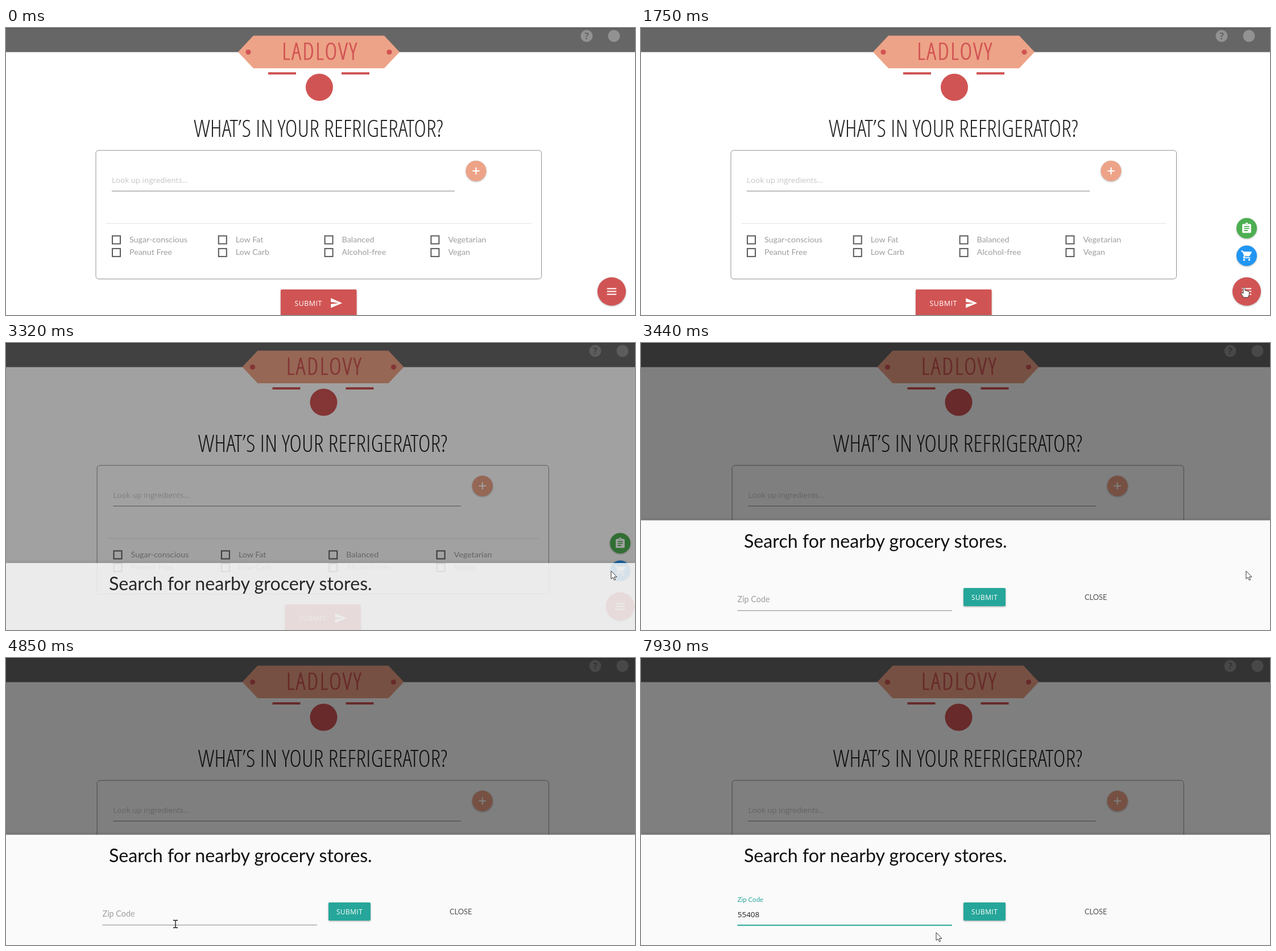
An HTML page for the animation above (8000 ms loop, 1106x506 px).

```html
<!DOCTYPE html>
<html lang="en">
<head>
<meta charset="utf-8">
<title>Recipe finder</title>
<style>
  html, body { margin: 0; width: 100%; height: 100%; overflow: hidden; background: #fff; }
  svg { display: block; width: 100%; height: 100%; }
  text { font-family: Lato, sans-serif; font-size: 14.3px; fill: #9e9e9e; white-space: pre; }
  .ui { font-family: "Open Sans", "Noto Sans", sans-serif; font-size: 13.4px; }
  .narrow { font-family: "Open Sans Condensed Light", "Open Sans Cond Light", "Noto Sans ExtraCondensed Light",
      "Noto Sans Condensed Light", "Open Sans", sans-serif;
    font-stretch: condensed; font-weight: 300; font-size: 39.5px; text-anchor: middle; }
  .headline { fill: #212121; }
  .brand { fill: #d15454; stroke: #d15454; stroke-width: .7; letter-spacing: 2.5px; }
  .button { font-size: 12.4px; font-weight: 500; letter-spacing: .5px; fill: #fff; }
  .raised { filter: drop-shadow(0 1.5px 1.5px rgba(0, 0, 0, .32)); }
  .icon { fill: none; stroke: #fff; stroke-width: 2.1; }
</style>
</head>
<body>
<svg viewBox="0 0 1106 506" xmlns="http://www.w3.org/2000/svg">
  <rect width="1106" height="506" fill="#fff"/>
  <g id="narrowPage"></g>
  <g id="widePage"></g>
  <rect id="shade" width="1106" height="506"/>
  <g id="sheet">
    <rect y="311.6" width="1106" height="210" fill="#fafafa" style="filter:drop-shadow(0 -1px 3px rgba(0,0,0,.16))"/>
    <text x="181" y="360" style="font-size:32.2px;fill:#111">Search for nearby grocery stores.</text>
    <text id="zipLabel" x="169.5">Zip Code</text>
    <text id="zip" class="ui" x="169.7" y="456.5" style="font-size:13.5px;fill:#222"></text>
    <rect id="caret" y="443" width="1" height="16" fill="#222"/>
    <rect id="zipLine" x="169.5" width="377.5"/>
    <rect class="raised" x="567" y="431" width="74" height="32" rx="2" fill="#26a69a"/>
    <text class="ui button" x="581" y="452.3" style="font-size:11.8px">SUBMIT</text>
    <text x="780" y="451.5" style="font-size:12.9px;fill:#555">CLOSE</text>
  </g>
  <g id="cursor">
    <circle id="ring" r="10" fill="none" stroke="#777" stroke-opacity=".45"/>
    <path id="arrow" d="M0 0V14L3.2 11.2 5.5 16.2 7.7 15.2 5.4 10.4H10Z" fill="#fff" stroke="#222" stroke-width=".9"/>
    <path id="hand" d="M-1.5 1.5Q0-1 1.5 1.5V6Q3 5 4 6.5 6 5.5 6.5 7.5 9 6.5 9 9V13L7 18H-1L-5.5 11Q-5 8.5-1.5 11Z"
      fill="#fff" stroke="#222" stroke-width=".9"/>
    <path id="beam" d="M-4-6.5H-1L0-6 1-6.5H4M0-6V6M-4 6.5H-1L0 6 1 6.5H4" fill="none" stroke="#111" stroke-width="1.3"/>
  </g>
</svg>
<script>
const LOOP = 8000;
const $ = id => document.getElementById(id);

// extra: width the page gains when its scrollbar disappears
function pageMarkup(extra) {
  const at = x => x * (1 + extra / 1099);
  const mid = extra / 2;
  const columns = [['Sugar-conscious', 'Peanut Free'], ['Low Fat', 'Low Carb'],
    ['Balanced', 'Alcohol-free'], ['Vegetarian', 'Vegan']];
  const checks = columns.map((labels, col) => labels.map((label, row) => {
    const x = at(186 + col * 186.8), y = 365.5 + row * 22.4;
    return `<rect x="${x + 1}" y="${y + 1}" width="14" height="14" fill="none" stroke="#5a5a5a" stroke-width="2"/>
      <text x="${x + 31}" y="${y + 12.5}">${label}</text>`;
  }).join('')).join('');
  const rule = (x1, x2, y, color) =>
    `<path d="M${at(x1)} ${y}H${at(x2)}" stroke="${color}"/>`;

  return `
  <rect width="1106" height="42.5" fill="#666"/><rect width="1106" height="1" fill="#505050"/>
  <g transform="translate(${extra})">
    <circle cx="1021" cy="14" r="10.5" fill="#929292"/>
    <text class="ui" x="1021" y="20" text-anchor="middle" style="font-size:16px;font-weight:700;fill:#666">?</text>
    <circle cx="1069" cy="14" r="10.5" fill="#929292"/>
  </g>
  <g transform="translate(${mid})">
    <path d="M408 42.3 435 13.5H665L692 42.3 665 71H435Z" fill="#eda387"/>
    <g fill="#d15454">
      <circle cx="426" cy="42.5" r="4.6"/><circle cx="674" cy="42.5" r="4.6"/>
      <path d="M461 78h49v4h-49zM590 78h49v4h-49z"/>
      <circle cx="551" cy="104.5" r="24"/>
    </g>
    <text class="narrow brand" data-max="138" x="552.5" y="56.3">LADLOVY</text>
    <text class="narrow headline" data-max="456" x="549.5" y="192">WHAT’S IN YOUR REFRIGERATOR?</text>
  </g>
  <rect x="${at(158)}" y="215.8" width="${at(783.5)}" height="226.7" rx="5" fill="none" stroke="#909090"/>
  <text class="ui" x="${at(186)}" y="273" style="fill:#c4c4c4">Look up ingredients...</text>
  ${rule(186, 789, 287.5, '#858585')}${rule(176, 924, 344.5, '#e4e4e4')}
  <g transform="translate(${at(826.5)} 252)">
    <circle class="raised" r="18" fill="#eda387"/><path class="icon" d="M-6.2 0H6.2M0-6.2V6.2"/>
  </g>
  ${checks}
  <g transform="translate(${mid})">
    <rect class="raised" x="483" y="461" width="133.5" height="50" rx="2" fill="#d15454"/>
    <text class="ui button" x="507.5" y="490">SUBMIT</text>
    <path transform="translate(569.3 473.5) scale(.95)" d="M2 21 23 12 2 3V10L17 12 2 14Z" fill="#fff"/>
  </g>
  <g transform="translate(${1065 + extra})">
    <g class="listFab"><g class="raised"><circle r="18" fill="#4caf50"/></g>
      <rect x="-7.8" y="-7.5" width="15.6" height="15.8" rx="1.5" fill="#fff"/>
      <circle cy="-7.5" r="2.4" fill="#fff"/><circle cy="-7.2" r=".9" fill="#4caf50"/>
      <path d="M-4.5-3.2H4.5M-4.5.4H4.5M-4.5 4H1.8" stroke="#4caf50" stroke-width="1.8"/></g>
    <g class="cartFab"><g class="raised"><circle r="18" fill="#2196f3"/></g>
      <g transform="scale(.9) translate(-12 -12)">
        <path class="icon" d="M1 3H4L8 12 6 15Q5.6 16 7 16H19"/>
        <path d="M5.2 4H21Q22.4 4 21.7 5.5L18 12Q17.5 13 16.3 13H8.5Z" fill="#fff"/>
        <circle cx="7" cy="20" r="2" fill="#fff"/><circle cx="17" cy="20" r="2" fill="#fff"/></g></g>
    <g transform="translate(0 464.5)">
      <circle class="raised" r="25" fill="#d15454"/><path class="icon" d="M-8.2-5H8.2M-8.2 0H8.2M-8.2 5H8.2"/></g>
  </g>`;
}

$('narrowPage').innerHTML = pageMarkup(0);
$('widePage').innerHTML = pageMarkup(15);

// Choose a font size that suits whichever light face is installed
for (const el of document.querySelectorAll('.narrow')) {
  const ratio = Math.min(1.06, el.dataset.max / el.getComputedTextLength());
  el.style.fontSize = 39.5 * ratio + 'px';
}

// Rows start with the time in ms and hold until the next row
const POINTER = [
  [0, null], [310, 'arrow', 1012, 496], [390, 'arrow', 1013, 478], [470, 'arrow', 1010, 462],
  [550, 'arrow', 1005, 450], [630, 'arrow', 999, 443], [710, 'arrow', 995, 441],
  [940, 'arrow', 997, 443], [1020, 'arrow', 1010, 448], [1100, 'arrow', 1030, 453],
  [1190, 'hand', 1048, 457], [1270, 'hand', 1058, 458], [1350, 'hand', 1060.5, 457],
  [2140, 'hand', 1063, 455], [2210, 'hand', 1065, 448], [2290, 'hand', 1066, 436],
  [2360, 'arrow', 1066, 424], [2430, 'hand', 1065, 412], [2510, 'hand', 1064, 405],
  [2580, 'hand', 1064, 402], [3120, 'arrow', 1064, 402],
  [4290, 'arrow', 1046, 404], [4370, 'arrow', 960, 411], [4450, 'arrow', 810, 424],
  [4530, 'arrow', 620, 441], [4610, 'beam', 455, 455], [4690, 'beam', 350, 464],
  [4770, 'beam', 308, 468], [4850, 'beam', 298, 469],
  [7850, 'arrow', 440, 478], [7930, 'arrow', 519, 484]
];
const RING = [[0, 0], [2890, 1], [3120, 0], [5210, 1], [5390, 0]];
const LIST_FAB = [[0, 0], [1600, .45], [1750, 1]];
const CART_FAB = [[0, 0], [1520, .6], [1600, .95], [1750, 1]];
const SHEET = [[0, 0, 0, 0], [3320, 76.3, .84, .37], [3440, 1, 1, .5], [3540, 0, 1, .5]];
const FOCUS = [[0, 0], [5390, .5], [5480, 1]];
const TYPED = [[0, 0], [6190, 1], [6350, 2], [6590, 3], [7040, 4], [7280, 5]];
const CARET = [[0, 0], [5390, 1], [5750, 0], [6190, 1], [7760, 0]];

const pick = (table, t) => table.findLast(row => row[0] <= t).slice(1);
const set = (el, attrs) => { for (const key in attrs) el.setAttribute(key, attrs[key]); };
const show = (el, on) => set(el, { visibility: on ? 'visible' : 'hidden' });

function placeFab(name, y, scale) {
  for (const el of document.querySelectorAll('.' + name)) {
    set(el, { transform: `translate(0 ${y}) scale(${scale})`, opacity: scale });
  }
}

function render(t) {
  const [drop, opacity, dark] = pick(SHEET, t);
  const open = opacity > 0;
  show($('narrowPage'), !open);
  show($('widePage'), open);
  set($('shade'), { opacity: dark });
  set($('sheet'), { transform: `translate(0 ${drop})`, opacity });

  placeFab('listFab', 353, pick(LIST_FAB, t)[0]);
  placeFab('cartFab', 401.5, pick(CART_FAB, t)[0]);

  const [focus] = pick(FOCUS, t);
  const [typed] = pick(TYPED, t);
  const label = $('zipLabel');
  set(label, { y: 456 - 26 * focus });
  label.style.fontSize = 14.4 - 2.9 * focus + 'px';
  label.style.fill = focus ? '#26a69a' : '#9e9e9e';
  set($('zipLine'), focus ? { y: 470.2, height: 2, fill: '#26a69a' } : { y: 470.3, height: 1, fill: '#858585' });
  $('zip').textContent = '55408'.slice(0, typed);
  set($('caret'), { x: 170 + 7.72 * typed, opacity: pick(CARET, t)[0] });

  const [kind, x, y] = pick(POINTER, t);
  for (const id of ['arrow', 'hand', 'beam']) show($(id), id === kind);
  show($('ring'), pick(RING, t)[0]);
  if (kind) set($('cursor'), { transform: `translate(${x} ${y})` });
}

const start = performance.now();
function tick() {
  render((performance.now() - start) % LOOP);
  requestAnimationFrame(tick);
}
tick();
</script>
</body>
</html>
```
